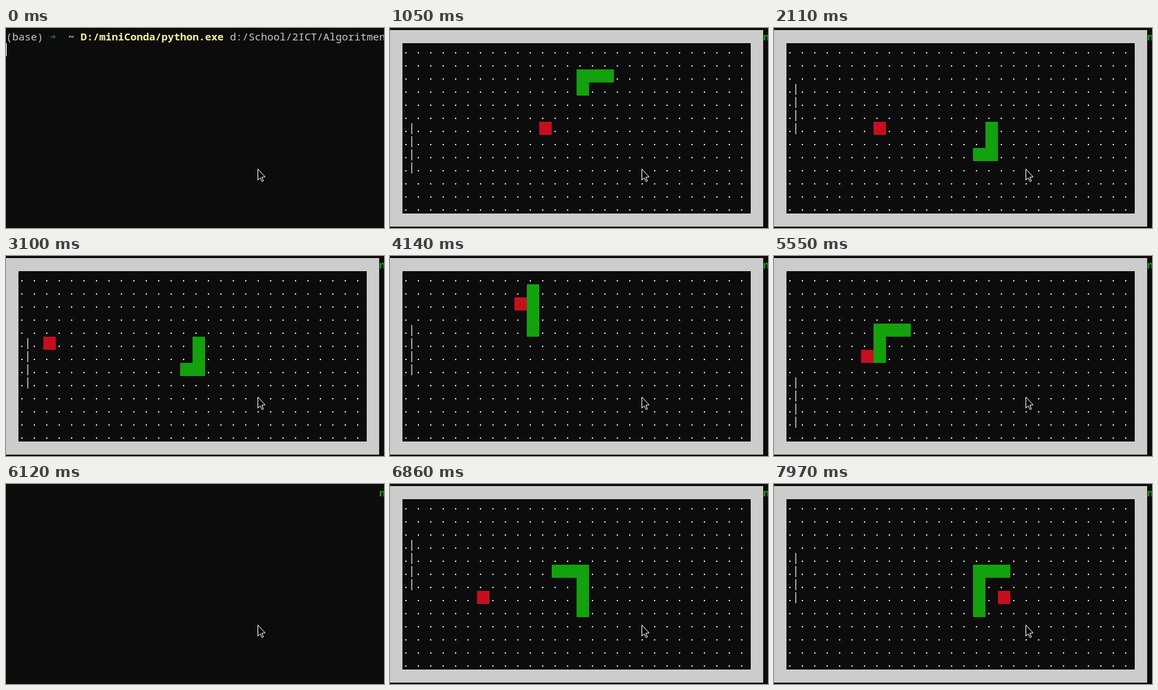
Animation, 547 px wide and 290 px high, one loop 8000 ms. Source, as an HTML page with a canvas:

```html
<!DOCTYPE html>
<html lang="en">
<head>
<meta charset="utf-8">
<title>Terminal snake pong</title>
<style>
  html, body { margin: 0; width: 100%; height: 100%; overflow: hidden; background: #0c0c0c; }
  canvas { display: block; }
</style>
</head>
<body>
<canvas id="stage" width="547" height="290"></canvas>
<script>
const ctx = document.getElementById('stage').getContext('2d');
const LOOP = 8000, CELL_W = 18, CELL_H = 19, TOP = 3;
const LAST_COL = 28, LAST_ROW = 13, WALL_SIZE = 4;
const BACK = '#0c0c0c', LIGHT = '#cccccc', GREEN = '#13a10e', RED = '#c50f1f', YELLOW = '#f9f1a5';

// Key points of the slightly uneven game clock: [tick, ms]
const CLOCK = [[0, 0], [1, 20], [10, 1050], [19, 2110], [36, 4140], [56, 6120], [57, 6150],
  [74, 7970], [75, LOOP]];

const states = [];
playRound({ first: 1, last: 55, length: 4, serve: [3, 7],
  path: walk(20, 9, 'U6 L5 D6 R2 U4 L2 D3 L4 U6 R3 D3 L6 D5 R1 U1') });
playRound({ first: 57, last: 74, length: 6, serve: [1, 8],
  path: walk(12, 11, 'U5 R3 D3 R3 U3 L2 D3') });

function walk(x, y, moves) {
  const steps = { L: [-1, 0], R: [1, 0], U: [0, -1], D: [0, 1] };
  const path = [[x, y]];
  for (const move of moves.split(' ')) {
    const [dx, dy] = steps[move[0]];
    for (let n = +move.slice(1); n > 0; n--) path.push([x += dx, y += dy]);
  }
  return path;
}

// The ball spends one tick turning at every bounce; a missed ball is served again and feeds the snake
function playRound({ first, last, length, serve, path }) {
  let [x, y] = serve, dx = 1, dy = 0, grown = 0;
  for (let tick = first; tick <= last; tick++) {
    const head = tick - first + length;
    const snake = path.slice(head - length - grown, head);
    const wall = 10 - Math.abs(9 - (tick - first + 15) % 18);

    if (tick > first) {
      const nextX = x + dx, nextY = y + dy;
      const hitsWall = nextX === 1 && dx < 0 && nextY >= wall && nextY < wall + WALL_SIZE;
      const hitsSnake = snake.some(([col, row]) => col === nextX && row === nextY);
      if (x === 1 && dx < 0) {
        [x, y] = serve;
        dx = 1;
        dy = 0;
        grown++;
      } else if (nextY < 1 || nextY > LAST_ROW) {
        dy = -dy;
      } else if (hitsWall || hitsSnake || nextX > LAST_COL) {
        dx = -dx;
        if (hitsWall) dy = dy || -1;
      } else {
        x = nextX;
        y = nextY;
      }
    }
    states[tick] = { snake, wall, ball: [x, y] };
  }
}

function tickAt(ms) {
  const i = CLOCK.findIndex(([, time]) => time > ms);
  const [k0, t0] = CLOCK[i - 1], [k1, t1] = CLOCK[i];
  return Math.floor(k0 + (k1 - k0) * (ms - t0) / (t1 - t0) + 1e-6);
}

function rect(color, x, y, w, h) {
  ctx.fillStyle = color;
  ctx.fillRect(x, y, w, h);
}

function cell(color, col, row, w = 1, h = 1) {
  rect(color, col * CELL_W, TOP + row * CELL_H, w * CELL_W, h * CELL_H);
}

function text(color, column, string, weight = 500) {
  ctx.font = `${weight} 15px "Noto Sans Mono", "DejaVu Sans Mono", monospace`;
  ctx.fillStyle = color;
  ctx.fillText(string, column * 9, 18);
}

function drawPrompt() {
  text(LIGHT, 0, '(base)');
  text('#13801a', 7, '➜');
  text(LIGHT, 10, '~', 600);
  text(YELLOW, 12, 'D:/miniConda/python.exe', 600);
  text(LIGHT, 36, 'd:/School/2ICT/Algoritmen');
  rect('#ffffff', 0, 22, 1, 19);
}

function drawBoard({ snake, wall, ball }) {
  cell(LIGHT, 0, 0, LAST_COL + 2, LAST_ROW + 2);
  cell(BACK, 1, 1, LAST_COL, LAST_ROW);
  for (let row = 1; row <= LAST_ROW; row++)
    for (let col = 1; col <= LAST_COL; col++)
      rect(LIGHT, col * CELL_W + 4, TOP + row * CELL_H + 13, 2, 2);
  for (let i = 0; i < WALL_SIZE; i++)
    rect(LIGHT, 30.8, TOP + (wall + i) * CELL_H + 2, 1.4, 16);
  cell(RED, ...ball);
  for (const part of snake) cell(GREEN, ...part);
}

function drawPointer() {
  const outline = [[0, 0], [0, 16], [3.5, 12.7], [6, 18], [8, 17.3], [5.8, 11.8], [10.5, 11.3]];
  ctx.beginPath();
  for (const [x, y] of outline) ctx.lineTo(364.5 + x, 204.5 + y);
  ctx.closePath();
  ctx.fillStyle = '#000000';
  ctx.fill();
  ctx.strokeStyle = '#ffffff';
  ctx.lineWidth = 1;
  ctx.stroke();
}

function draw(ms) {
  const tick = tickAt(ms);
  rect(BACK, 0, 0, 547, 290);
  if (tick === 0) drawPrompt();
  else text(GREEN, 60, 'n', 700);
  if (states[tick]) drawBoard(states[tick]);
  drawPointer();
}

const began = performance.now();
function frame() {
  draw((performance.now() - began) % LOOP);
  requestAnimationFrame(frame);
}
frame();
</script>
</body>
</html>
```
